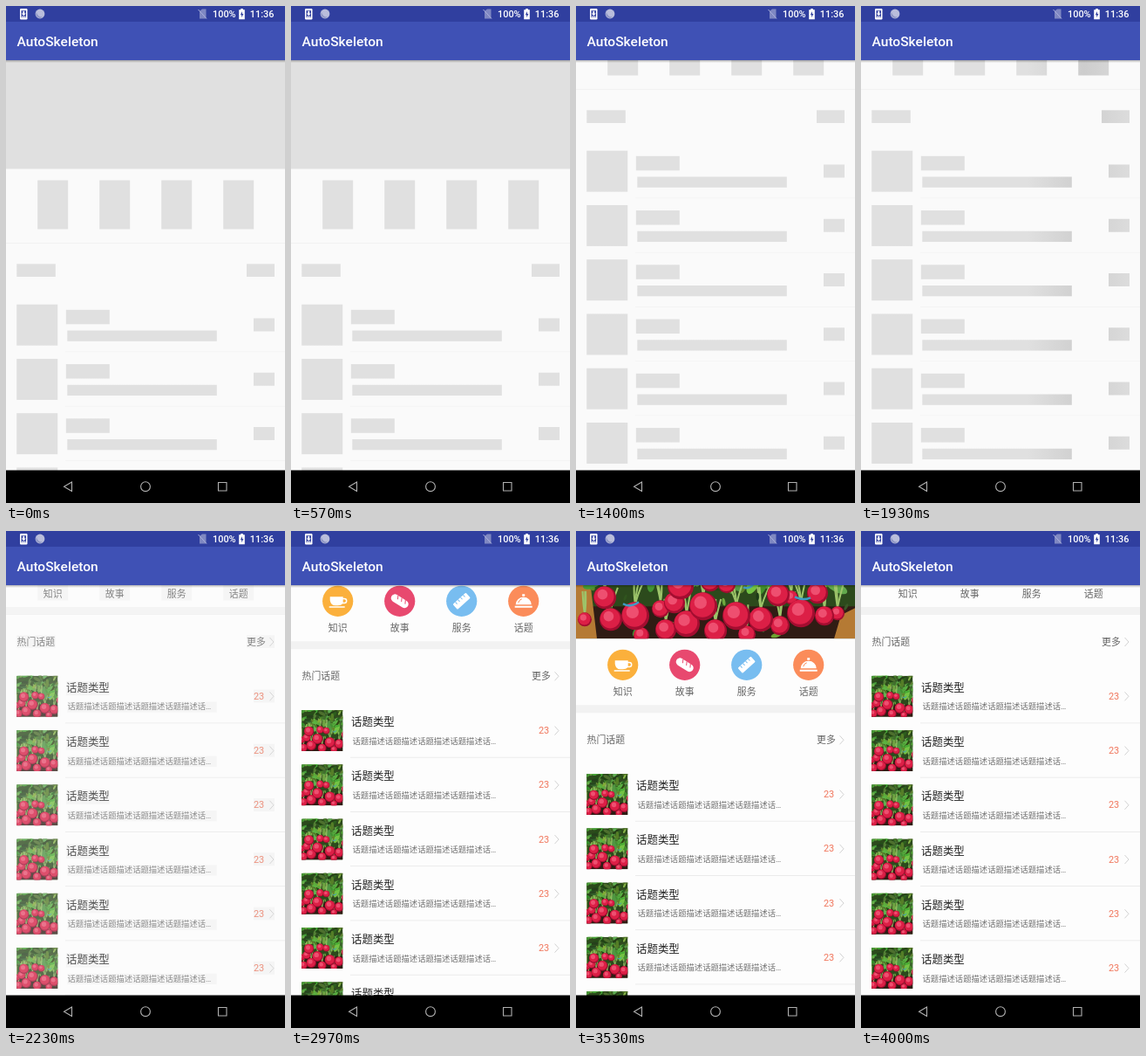
Animation, 320 px wide and 569 px high, one loop 4030 ms. Source, as an HTML page:

```html
<!DOCTYPE html>
<html lang="zh">
<head>
<meta charset="utf-8">
<title>AutoSkeleton</title>
<style>
html, body { margin: 0; width: 100%; height: 100%; overflow: hidden; background: #000; }
svg { display: block; width: 100%; height: 100%; }
text { font: 10.9px Roboto, "Noto Sans CJK SC", "Noto Sans CJK", sans-serif; fill: #666; }
.mid { text-anchor: middle; }
.bar text { font-weight: 500; fill: #fff; }
.bar .app { font-size: 15.55px; }
.name { font-size: 12.44px; fill: #222; }
.desc { font-size: 9.33px; fill: #707070; }
.count { fill: #f0765c; }
.line { fill: none; stroke: #d2d2d2; }
.white { fill: #fff; }
.nav { fill: none; stroke: #b0b0b0; stroke-width: 1.1; }
</style>
</head>
<body>
<svg viewBox="0 0 320 569" preserveAspectRatio="none">
  <defs>
    <linearGradient id="shine" gradientUnits="userSpaceOnUse" x1="-65" x2="65" y1="0" y2="0">
      <stop offset="0" stop-color="#e0e0e0"/>
      <stop offset=".5" stop-color="#cdcdcd"/>
      <stop offset="1" stop-color="#e0e0e0"/>
    </linearGradient>
    <linearGradient id="shade" x2="0" y2="1">
      <stop offset="0" stop-opacity=".28"/>
      <stop offset="1" stop-opacity="0"/>
    </linearGradient>
    <clipPath id="wide"><rect width="320" height="125"/></clipPath>
    <clipPath id="square"><rect x="97.500" width="125" height="125"/></clipPath>
    <g id="photo"></g>
    <g id="thumb" clip-path="url(#square)"><use href="#photo"/></g>
  </defs>

  <rect width="320" height="569" fill="#fdfdfd"/>
  <g id="page">
    <g id="content"></g>
    <g id="skeleton"></g>
  </g>
  <rect y="62" width="320" height="3" fill="url(#shade)"/>

  <g class="bar">
    <rect width="320" height="18" fill="#303f9f"/>
    <rect y="18" width="320" height="44" fill="#3f51b5"/>
    <rect x="16" y="3" width="8.500" height="12.500" rx="1.200" fill="#fff"/>
    <path d="M17.500 5.200h5.500v8h-5.500z" fill="#303f9f"/>
    <path d="M19.400 5.800h1.800v2.600h1.600l-2.500 2.800-2.500-2.800h1.600zM18 11.800h4.600v.9H18z" fill="#fff"/>
    <circle cx="39" cy="9" r="5.400" fill="#b9bddb"/>
    <path d="M35 7a4.500 4.500 0 0 0 7 5.500a6 6 0 0 1-7-5.500" fill="#8e95c4"/>
    <path d="M222 6l3-2.500h4.500v11h-7.500z" fill="#7f88c2"/>
    <path d="M220.500 4l9.500 10.500" stroke="#aab0db"/>
    <text x="237" y="13">100%</text>
    <path d="M269.200 3h2.600v1.300h2v10.900h-6.600V4.300h2z" fill="#fff"/>
    <path d="M271 6l-2.200 4.300h1.500v3l2.100-4.300h-1.400z" fill="#303f9f"/>
    <text x="279.800" y="13">11:36</text>
    <text class="app" x="12.500" y="46">AutoSkeleton</text>
  </g>

  <rect y="531.500" width="320" height="37.500"/>
  <g class="nav">
    <path d="M75.500 545v10.500l-9-5.250zM243.500 545.500h9.500v9.500h-9.500z"/>
    <circle cx="160" cy="550.200" r="5.400"/>
  </g>
</svg>
<script>
const LOOP = 4030, STEP = 100 / 3, MAX = 176;
const ROWS = 6, ROW_TOP = 333.5, PITCH = 62.25;
const byId = id => document.getElementById(id);
const rows = Array.from({ length: ROWS }, (_, i) => i * PITCH);

let seed = 7;
const rnd = (a, b) => a + (b - a) * ((seed = seed * 16807 % 2147483647) / 2147483647);

const box = (x, y, w, h, fill) => `<rect x="${x}" y="${y}" width="${w}" height="${h}" fill="${fill}"/>`;
const text = (x, y, str, cls = '') => `<text x="${x}" y="${y}" class="${cls}">${str}</text>`;
const chevron = y => `<path class="line" d="M302.500 ${y - 5}l4.500 5l-4.500 5"/>`;

function leaves(n, x0, x1, y0, y1, size) {
  let out = '';
  for (let i = 0; i < n; i++) {
    const x = rnd(x0, x1), y = rnd(y0, y1), r = rnd(.5, 1) * size;
    const fill = `hsl(${rnd(82, 115)} ${rnd(35, 55)}% ${rnd(16, 52)}%)`;
    out += `<ellipse rx="${r}" ry="${r * .4}" fill="${fill}" transform="translate(${x} ${y}) rotate(${rnd(0, 180)})"/>`;
  }
  return out;
}

const radish = (x, y, r) =>
  `<circle cx="${x}" cy="${y}" r="${r}" fill="#a30d30"/>` +
  `<circle cx="${x - r * .06}" cy="${y - r * .1}" r="${r * .88}" fill="#dc1f46"/>` +
  `<circle cx="${x - r * .2}" cy="${y - r * .28}" r="${r * .45}" fill="#ee4f70"/>`;

// Three leaf stalks fan out from the top of a radish.
const stalks = (x, y, r) => [-6, 0, 6].map(dx =>
  `<path d="M${x} ${y - r * .8}q${dx * .3} -10 ${dx + rnd(-5, 5)} -26" stroke="#9dc46a" stroke-width="2" fill="none"/>`).join('');

function photo() {
  const roots = [
    [10, 103, 8], [33, 78, 13], [277, 73, 12], [300, 96, 8], [247, 78, 8], [154, 60, 11], [173, 63, 10],
    [97, 91, 10], [113, 84, 12], [120, 65, 15], [232, 75, 13], [75, 121, 9], [196, 120, 10], [234, 110, 11],
    [40, 103, 13], [68, 99, 16], [103, 115, 12], [127, 108, 15], [160, 116, 13], [146, 88, 16],
    [212, 103, 14], [184, 99, 16], [285, 99, 11], [258, 96, 16]];
  return box(0, 0, 320, 125, '#2c4a1c') +
    box(0, 88, 320, 37, '#301c14') +
    '<path d="M0 40l16 18l8 67H0zM320 90l-16 8l-8 27h24z" fill="#b57a34"/>' +
    leaves(120, 15, 320, -5, 66, 17) + roots.map(r => stalks(...r)).join('') +
    leaves(70, 15, 320, -5, 48, 13) + leaves(25, 30, 315, 72, 122, 7) +
    roots.map(r => radish(...r)).join('') +
    '<path d="M54 85q8 5 18-2M192 66q7 3 12-4M251 77q9 5 18 1" stroke="#3f9cc4" stroke-width="2.500" fill="none"/>';
}

// Icon shapes are centred on 0,0.
const menu = [
  ['知识', '#fbb03c', '<path class="white" d="M-9-5H6v1.500h1.500a3 3 0 0 1 0 6.500H5.500Q4 5 0 5H-3Q-8 5-9-1zM-10 6H8v1.500H-10z"/><path d="M6-2h1.500a1.500 1.500 0 0 1 0 3.500H6z" fill="#fbb03c"/>'],
  ['故事', '#e8496f', '<g transform="rotate(32)"><rect class="white" x="-11" y="-4.500" width="22" height="9" rx="4.500"/><path d="M-5-4.500l2 4M0-4.500l2 4M5-4.500l2 4" stroke="#e8496f"/></g>'],
  ['服务', '#78bdf0', '<g transform="rotate(-42)"><rect class="white" x="-10" y="-4" width="20" height="8" rx="1"/><path d="M-6-4v3M-2-4v3M2-4v3M6-4v3" stroke="#78bdf0"/></g>'],
  ['话题', '#fb8c5a', '<path class="white" d="M-9 4a9 8.500 0 0 1 18 0zM-10 5.500H10V7.500H-10zM-1.500-8h3v2.500h-3z"/><path d="M-6 2a6 6 0 0 1 4-4.500" stroke="#fb8c5a" fill="none"/>']
];
const menuX = i => 53.7 + i * 71;

byId('photo').innerHTML = photo();

byId('content').innerHTML =
  '<g transform="translate(0 62)" clip-path="url(#wide)"><use href="#photo"/></g>' +
  menu.map(([label, fill, icon], i) =>
    `<g transform="translate(${menuX(i)} 217)"><circle r="17.600" fill="${fill}"/>${icon}</g>` +
    text(menuX(i), 252, label, 'mid')).join('') +
  box(0, 263, 320, 9, '#f2f2f2') +
  text(12.5, 307, '热门话题') + text(276, 307, '更多') + chevron(303) +
  rows.map(y => `<g transform="translate(0 ${ROW_TOP + y})">` +
    '<use href="#thumb" transform="translate(12.200 8.200) scale(.376) translate(-97.500 0)"/>' +
    text(69, 26.3, '话题类型', 'name') +
    text(70.5, 46.8, '话题描述'.repeat(4) + '话…', 'desc') +
    text(284, 35.3, '23', 'count') + chevron(31.8) +
    box(68, 62, 252, .8, '#e8e8e8') + '</g>').join('');

const block = (x, y, w, h) => box(x, y, w, h, 'url(#shine)');
byId('skeleton').innerHTML =
  box(0, 62, 320, 648, '#fafafa') +
  block(0, 62, 320, 124.5) +
  menu.map((_, i) => block(menuX(i) - 17.5, 199.5, 35, 56)).join('') +
  box(0, 271, 320, 1, '#f2f2f2') +
  block(12.3, 295.3, 44.5, 14.7) + block(276, 295.3, 32, 14.7) +
  rows.map(y => `<g transform="translate(0 ${ROW_TOP + y})">` +
    block(12.2, 8.2, 47, 47) + block(68.8, 14.3, 50, 16.5) +
    block(70.3, 38, 171.5, 12.3) + block(284, 24, 24, 15) +
    box(68, 62, 252, .8, '#f3f3f3') + '</g>').join('');

const ramp = (t, start, length) => Math.min(1, Math.max(0, (t - start) / length));
const easeOut = u => 1 - (1 - u) ** 2;
const smooth = u => u * u * (3 - 2 * u);

function scrollAt(t) {
  if (t < 2930) return MAX * easeOut(ramp(t, 1200, 200));
  if (t < 3210) return MAX * (1 - easeOut(ramp(t, 2937, 250)));
  return MAX * smooth(ramp(t, 3220, 770));
}

function draw(now) {
  const t = Math.floor((now % LOOP + 4) / STEP) * STEP;
  // The shimmer returns to its hidden start once a sweep is over.
  const sweep = (t < 1600 ? ramp(t, 0, 560) : ramp(t, 1600, 399)) % 1;
  byId('shine').setAttribute('gradientTransform', `translate(${-70 + 390 * sweep} 0)`);
  byId('page').setAttribute('transform', `translate(0 ${-scrollAt(t)})`);
  byId('skeleton').setAttribute('opacity', 1 - ramp(t, 2133, 133));
}

const begin = performance.now();
function tick() {
  draw(performance.now() - begin);
  requestAnimationFrame(tick);
}
tick();
</script>
</body>
</html>
```
